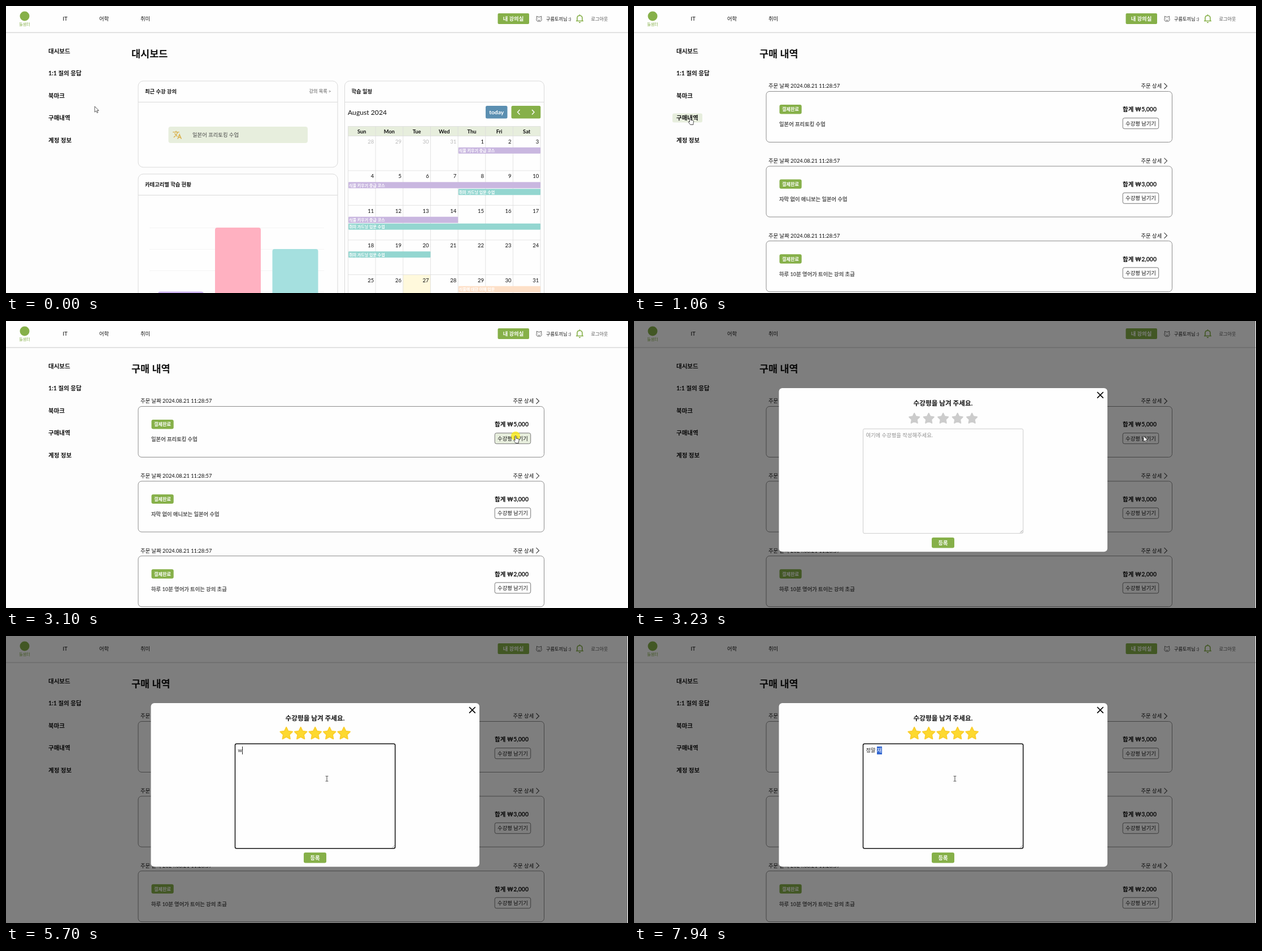
These frames come from a looping animation (1101x509 px, 8000 ms). An HTML page:

```html
<!DOCTYPE html>
<html lang="ko">
<head>
<meta charset="utf-8">
<title>구매 내역</title>
<style>
html, body { margin: 0; width: 100%; height: 100%; overflow: hidden; background: #fdfdfd; }
body, text { font-family: Lato, "Noto Sans CJK KR", sans-serif; }
svg { position: absolute; left: 0; top: 0; display: block; }
#entry { position: absolute; left: 410.4px; top: 196px; height: 14px; font-size: 9.33px; line-height: 14px; white-space: pre; color: #222; }
#entry * { display: inline-block; height: 14px; vertical-align: top; }
#entry mark { background: #3367d1; color: #fff; }
#entry i { width: 1px; margin-right: -1px; background: #222; }
#entry em { color: #8e8e8e; font-style: normal; }
</style>
</head>
<body>
<svg id="stage" width="1101" height="509" viewBox="0 0 1101 509"></svg>
<div id="entry"></div>
<script>
const GREEN = '#86b049', PALE = '#e7eedd', PURPLE = '#c9b7e0', TEAL = '#93d6d0', INK = '#111';
const S = 8.17, M = 9.33, L = 10.5;
const $ = id => document.getElementById(id);

// y is the middle of the glyphs
const text = (x, y, size, str, { w = 400, fill = INK, at = 'start' } = {}) =>
  `<text x="${x}" y="${y + size * .37}" font-size="${size}" font-weight="${w}" fill="${fill}" text-anchor="${at}">${str}</text>`;
const box = (x1, y1, x2, y2, r, fill, stroke = 'none', extra = '') =>
  `<rect x="${x1}" y="${y1}" width="${x2 - x1}" height="${y2 - y1}" rx="${r}" fill="${fill}" stroke="${stroke}" ${extra}/>`;
const line = (d, stroke, width = 1, extra = '') =>
  `<path d="${d}" fill="none" stroke="${stroke}" stroke-width="${width}" ${extra}/>`;
const group = (id, body) => `<g id="${id}">${body}</g>`;

const bold = { w: 700 }, white = { w: 700, fill: '#fff' };

function header() {
  return box(0, 0, 1101, 46.5, 0, '#fefefe') + box(0, 46.3, 1101, 48, 0, '#dedede')
    + `<circle cx="33" cy="18" r="8.5" fill="${GREEN}"/>`
    + text(33, 32, 7, '들샘터', { w: 500, fill: GREEN, at: 'middle' })
    + [[100.5, 'IT'], [165, '어학'], [238, '취미']].map(([x, s]) => text(x, 22.5, M, s, { w: 500 })).join('')
    + box(870.5, 13, 926, 32, 2, GREEN) + text(898, 22.5, M, '내 강의실', { ...white, at: 'middle' })
    + line('M939.5 21V18L942 19.5H945L947.5 18V21Q950 27.5 943.5 27.5Q937 27.5 939.5 21M941.5 22.5V23.5M945.5 22.5V23.5M941.5 25.5H945.5', '#444', .8)
    + text(956, 22.5, S, '구름토끼님 :)', { w: 500 })
    + line('M1009 26.5H1022M1011 26V21.5Q1011 17 1015.5 17T1020 21.5V26M1015.5 15V17M1014 29.3H1017', GREEN, 1.6)
    + text(1035.5, 22.5, S, '로그아웃', { fill: '#555' });
}

function sidebar() {
  const items = ['대시보드', '1:1 질의 응답', '북마크', '구매내역', '계정 정보'];
  return box(68, 190.5, 121, 206.5, 3, PALE, 'none', 'id="menuHover"')
    + items.map((s, i) => text(75, 80 + i * 39.5, L, s, bold)).join('');
}

function calendar() {
  const X = 605.5, Y = 230.5, CW = 48.65, RH = 61.5, edge = '#dcdcdc';
  const event = (row, slot, from, to, fill, name) => {
    const x = X + from * CW + .7, y = Y + row * RH + 20.3 + slot * 12;
    return box(x, y, X + to * CW, y + 11, 1, fill) + text(x + 1, y + 5.8, 7.05, name, white);
  };
  const plant = '식물 키우기 중급 코스', garden = '취미 가드닝 입문 수업';
  let out = text(605, 188.5, 12.2, 'August 2024')
    + box(849, 177, 887.5, 199.5, 2.5, '#5b8fb1') + text(868.2, 188, 10.3, 'today', { ...white, at: 'middle' })
    + box(894.5, 177, 946.3, 199.5, 2.5, GREEN)
    + line('M909.5 184L905.5 188.3L909.5 192.6M931 184L935 188.3L931 192.6', '#fff', 1.4)
    + box(X, 213.5, 946, Y, 0, PALE)
    + box(X + 2 * CW, Y + 4 * RH, X + 3 * CW, 509, 0, '#fff9dc');
  for (let c = 0; c <= 7; c++) out += line(`M${X + c * CW} 213.5V509`, edge, .8);
  for (let r = 0; r < 5; r++) out += line(`M${X} ${Y + r * RH}H946`, edge, .8);
  out += line(`M${X} 213.5H946`, edge, .8);
  'Sun Mon Tue Wed Thu Fri Sat'.split(' ').forEach((d, c) =>
    out += text(X + (c + .5) * CW, 222.3, M, d, { w: 700, at: 'middle' }));
  for (let i = 0; i < 35; i++) {
    const c = i % 7, r = (i - c) / 7;
    out += text(X + (c + 1) * CW - 2.8, Y + r * RH + 9.8, 9.5, i < 4 ? 28 + i : i - 3,
      { at: 'end', fill: i < 4 ? '#bbb' : INK });
  }
  return out + event(0, 0, 4, 7, PURPLE, plant)
    + event(1, 0, 0, 7, PURPLE, plant) + event(1, 1, 4, 7, TEAL, garden)
    + event(2, 0, 0, 4, PURPLE, plant) + event(2, 1, 0, 7, TEAL, garden)
    + event(3, 0, 0, 3, TEAL, garden)
    + event(4, 0, 4, 7, '#fde0c8', '식물에 대한 이해 입문');
}

function dashboard() {
  const card = (x1, y1, x2, y2, title) => box(x1, y1, x2, y2, 9, '#fefefe', '#dadada')
    + line(`M${x1} ${y1 + 37.5}H${x2}`, '#dadada') + text(x1 + 12, y1 + 19, M, title, bold);
  const bar = (x, y, fill) => box(x, y, x + 81, 530, 4, fill);
  return text(222, 85, 17.5, '대시보드', bold)
    + card(234, 133, 587, 286, '최근 수강 강의')
    + text(575.5, 150.5, S, '강의 목록 &gt;', { at: 'end', fill: '#555' })
    + box(287.5, 214, 534, 243, 4, PALE)
    + `<g transform="translate(294.5 220) scale(.72)">${line('M1 5H17M9 2V5M13.2 5C12 9 8 14 3.3 18M5.7 8C7 11 9 13.5 12.5 16M13 22L17.5 11L22 22M15 18H20', '#d9b04a', 2)}</g>`
    + text(330, 228.7, M, '일본어 프리토킹 수업', { fill: '#444' })
    + card(234, 298, 587, 560, '카테고리별 학습 현황')
    + line('M254 393.5H563M254 431.5H563M254 469.5H563M254 507H563', '#f4f4f4')
    + bar(269, 506.5, '#ccb2f2') + bar(370, 393, '#ffb1c1') + bar(471.5, 431, '#a5e0df')
    + card(599.5, 133, 952.5, 560, '학습 일정') + calendar();
}

function orders() {
  const rows = [['일본어 프리토킹 수업', '5,000'], ['자막 없이 애니보는 일본어 수업', '3,000'], ['하루 10분 영어가 트이는 강의 초급', '2,000']];
  return text(222, 85, 17.5, '구매 내역', bold) + rows.map(([name, price], i) =>
    `<g transform="translate(0 ${i * 132.6})">`
    + text(238, 142, M, '주문 날짜 2024.08.21 11:28:57') + text(897.5, 142, M, '주문 상세')
    + line('M938.5 137L943.5 142L938.5 147', '#444', 1.2)
    + box(234, 151.5, 952.5, 241.5, 6, '#fefefe', '#8c8c8c')
    + box(257.5, 175, 296.7, 191.5, 3, GREEN) + text(277, 183.3, S, '결제완료', { ...white, at: 'middle' })
    + text(257, 210, M, name, { w: 700, fill: '#555' })
    + text(865, 183.5, L, '합계 ₩' + price, bold)
    + box(865.2, 198.7, 928.7, 217.7, 3, '#fefefe', '#777', i ? '' : 'id="review"')
    + text(897, 208.3, M, '수강평 남기기', { at: 'middle' }) + '</g>').join('');
}

function star(cx, cy, r) {
  const pts = Array.from({ length: 10 }, (_, i) => {
    const a = i * Math.PI / 5, q = i % 2 ? r * .5 : r;
    return `${(cx + q * Math.sin(a)).toFixed(2)},${(cy - q * Math.cos(a)).toFixed(2)}`;
  });
  return `<polygon points="${pts.join(' ')}" stroke-width="2" stroke-linejoin="round"/>`;
}

function modal() {
  const stars = (y, r) => [0, 1, 2, 3, 4].map(i => star(496.2 + i * 25.5, y, r)).join('');
  return box(0, 0, 1100, 509, 0, 'rgba(0,0,0,.5)') + box(256.5, 119, 838, 409.3, 6, '#fefefe')
    + line('M820 126L830.7 136.7M830.7 126L820 136.7', '#000', 1.7)
    + text(547, 145.8, 11.67, '수강평을 남겨 주세요.', { w: 700, at: 'middle' })
    + `<g id="grey" fill="#ccc" stroke="#ccc">${stars(173.2, 9.5)}</g>`
    + `<g id="gold" fill="#fdd92f" stroke="#fbcf2c">${stars(173.2, 11.3)}</g>`
    + box(405.5, 191.3, 688.8, 376.7, 2.5, '#fefefe', '#ccc', 'id="area"')
    + line('M683.5 375.5L687.8 371.2M686 375.5L687.8 373.7', '#777', .7)
    + box(527, 384, 567, 402.6, 3, GREEN) + text(547, 393.2, M, '등록', { ...white, at: 'middle' });
}

$('stage').innerHTML = header() + sidebar() + group('dash', dashboard()) + group('orders', orders()) + group('modal', modal())
  + '<circle id="click" r="8" fill="#ffec00" fill-opacity=".72"/>'
  + `<g id="cursor" stroke-linejoin="round">
    <path id="arrow" d="M0 0V10.2L2.5 8L4.2 11.6L5.8 10.9L4.2 7.4H7.2Z" fill="#fff" stroke="#333" stroke-width=".8"/>
    <path id="hand" d="M-1 8V.6A1 1 0 0 1 1 .6V4.2L5.2 5.2Q6.4 5.6 6.2 6.9L5.4 10.2V12.5H.2L-3 8.2Q-3.6 7-2.6 6.6Q-1.8 6.6-1 8Z" fill="#fff" stroke="#222" stroke-width=".8"/>
    <path id="beam" d="M-2.3-4.5H-.5L0-4L.5-4.5H2.3M0-4V4M-2.3 4.5H-.5L0 4L.5 4.5H2.3" fill="none" stroke="#333" stroke-width=".9"/></g>`;

// first step, last step, step count, then the points passed
const moves = [
  [70, 190, 3, [157, 178], [136, 178]],
  [390, 920, 8, [136, 178], [118, 186], [99.5, 198]],
  [1520, 2004, 8, [99.5, 198], [500, 194], [859, 199]],
  [2073, 2280, 4, [859, 199], [888, 204]],
  [2350, 2890, 8, [888, 204], [893, 170], [902, 204]],
  [3560, 4260, 11, [902, 204], [800, 222], [610, 214], [545, 174]],
  [4460, 4600, 3, [545, 174], [598, 174]],
  [4740, 4880, 3, [598, 174], [568, 253]],
];
const clicks = [[990, 1060], [3100, 3230], [4670, 4740], [4950, 5020]];
const PAGE = 1060, OPEN = 3230, RATED = 4740, FOCUS = 4950;

const hint = '<em>여기에 수강평을 작성해주세요.</em>', caret = '<i></i>';
const compose = (done, part) => `${done}<mark>${part}</mark>`;
const typing = [
  [OPEN, hint], [FOCUS, caret + hint], [5480, hint], [5700, 'w' + caret], [6160, caret + hint],
  [6270, compose('', 'ㅈ')], [6370, compose('', '저')], [6470, compose('', '정')],
  [6570, compose('정', 'ㅁ')], [6670, compose('정', '마')], [6770, compose('정', '말')],
  [6860, '정말' + caret], [6950, '정말 ' + caret],
  [7020, compose('정말 ', 'ㅈ')], [7130, compose('정말 ', '재')], [7240, compose('정말 ', '잼')], [7350, compose('정말 재', '미')],
  [7610, compose('정말 재', 'ㅁ')], [7720, '정말 재' + caret], [7830, compose('정말 ', 'ㅈ')], [7940, compose('정말 ', '재')],
];

function cursorAt(t) {
  let pos = moves[0][3];
  for (const [start, end, steps, ...pts] of moves) {
    if (t < start) break;
    const k = Math.min(steps, Math.floor((t - start) / (end - start) * (steps - 1) + 1e-6) + 1);
    const u = k / steps * (pts.length - 1), i = Math.min(pts.length - 2, Math.floor(u));
    pos = [0, 1].map(a => pts[i][a] + (pts[i + 1][a] - pts[i][a]) * (u - i));
  }
  return pos;
}

const show = (id, on) => $(id).setAttribute('visibility', on ? 'visible' : 'hidden');
let shown = null;

function render(t) {
  const [x, y] = cursorAt(t);
  const over = (x1, y1, x2, y2) => x >= x1 && x <= x2 && y >= y1 && y <= y2;
  const open = t >= OPEN;
  const onMenu = !open && over(68, 190, 121, 207), onReview = !open && t >= PAGE && over(865, 198, 929, 218);
  const onStars = open && over(485, 161, 610, 185);
  const onText = open ? over(405, 191, 689, 377) : t >= PAGE && over(865, 177, 923, 190);
  const kind = onMenu || onReview || onStars ? 'hand' : onText ? 'beam' : 'arrow';

  show('dash', t < PAGE);
  show('orders', t >= PAGE);
  show('modal', open);
  show('menuHover', onMenu);
  $('review').setAttribute('fill', onReview ? PALE : '#fefefe');
  show('grey', open && t < RATED);
  show('gold', t >= RATED);
  $('area').setAttribute('stroke', t >= FOCUS ? '#111' : '#ccc');
  $('area').setAttribute('stroke-width', t >= FOCUS ? 1.5 : 1);

  for (const id of ['arrow', 'hand', 'beam']) show(id, id === kind);
  for (const id of ['cursor', 'click']) $(id).setAttribute('transform', `translate(${x} ${y})`);
  show('click', clicks.some(([a, b]) => t >= a && t < b));

  const entry = typing.filter(([at]) => t >= at).pop()?.[1] ?? '';
  if (entry !== shown) $('entry').innerHTML = shown = entry;
}

const origin = performance.now();
function tick() {
  render((performance.now() - origin) % 8000);
  requestAnimationFrame(tick);
}
tick();
</script>
</body>
</html>
```
